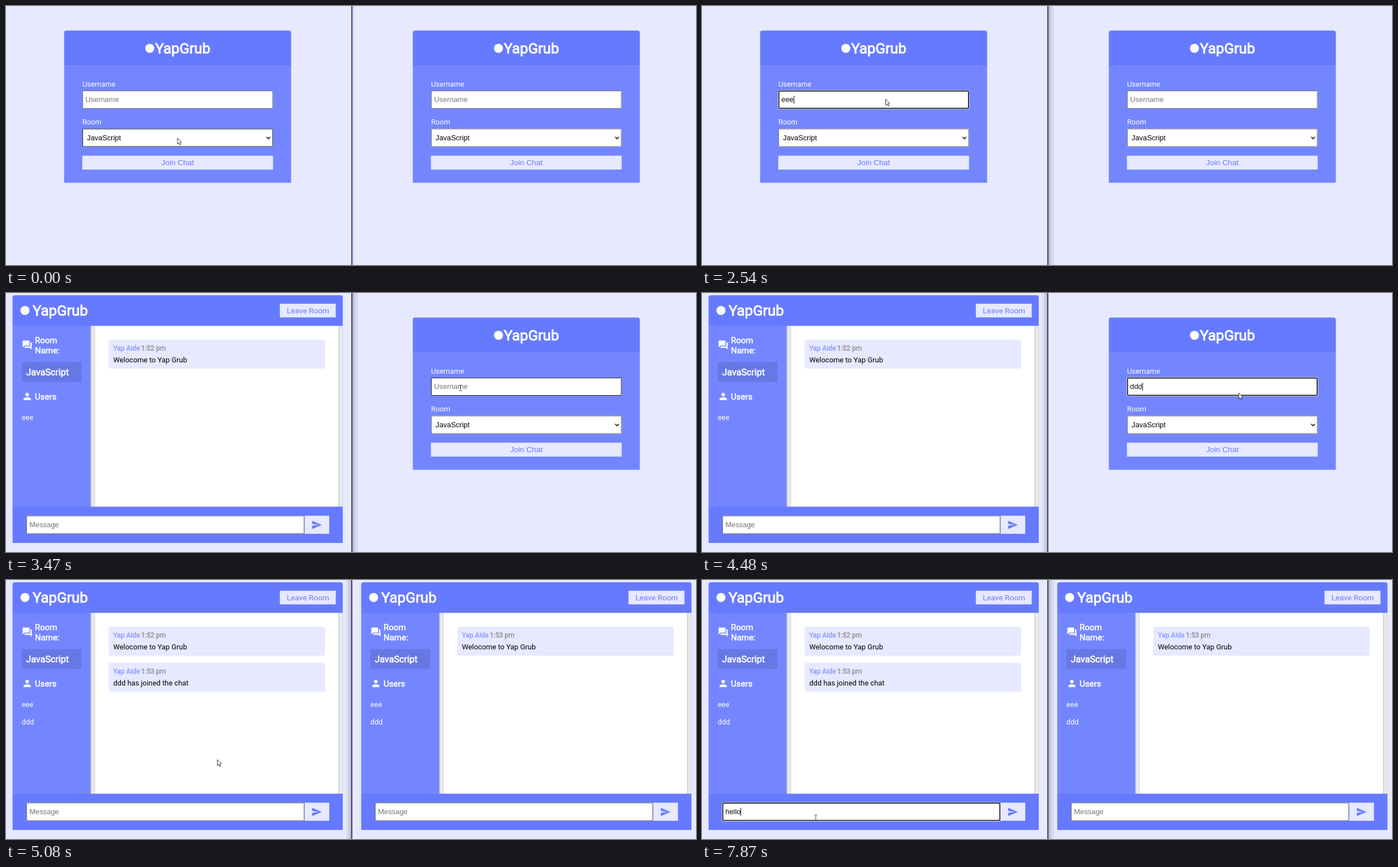
An HTML page with a canvas for the animation above (8 s loop, 1219 by 459 pixels).

```html
<!DOCTYPE html>
<html lang="en">
<head>
<meta charset="utf-8">
<title>Chat demo</title>
<style>
  html, body { margin: 0; width: 100%; height: 100%; overflow: hidden; background: #e6e9ff; }
  canvas { display: block; }
</style>
</head>
<body>
<canvas id="stage" width="1219" height="459"></canvas>
<script>
const ctx = document.getElementById('stage').getContext('2d');
const LOOP = 8000, RIGHT = 616, TICK = 1000 / 15;
const DARK = '#667aff', MID = '#7386ff', LIGHT = '#e6e9ff';
const ROBOTO = 'Roboto, sans-serif';
const ARIAL = '"Liberation Sans", Arial, sans-serif';
const TIMES = '"Liberation Serif", "Times New Roman", serif';
const BODY = 12.85, HEADING = 15, TITLE = 25.7, BUTTON = 13.64, ICON = 19.26;
const APP = 'YapGrub', APP_SPACED = 'Yap Grub', BOT = 'Yap Aide';
const USERS = ['eee', 'ddd'];

const ICONS = {
  forum: new Path2D('M21 6h-2v9H6v2c0 .55.45 1 1 1h11l4 4V7c0-.55-.45-1-1-1zm-4 6V3c0-.55-.45-1-1-1H3c-.55 0-1 .45-1 1v14l4-4h10c.55 0 1-.45 1-1z'),
  person: new Path2D('M12 12c2.21 0 4-1.79 4-4s-1.79-4-4-4-4 1.79-4 4 1.79 4 4 4zm0 2c-2.67 0-8 1.34-8 4v2h16v-2c0-2.66-5.33-4-8-4z'),
  send: new Path2D('M2.01 21L23 12 2.01 3 2 10l15 2-15 2z')
};

// Timeline in ms
const LEFT = { focus: 890, keys: [2080, 2210, 2410], busy: 2540, load: 2740, ready: 2810 };
const PEER = { focus: 3740, keys: [3950, 4150, 4280], busy: 4480, load: 4680, ready: 4750 };
const MESSAGE = { focus: 5740, keys: [7280, 7410, 7550, 7740, 7870], text: 'hello' };
const TIP = { from: 6340, to: 7340 };
const BLINK = 530;

// Pointer path: time, x, y
const PATH = [
  [330, 303, 234], [460, 306, 222], [600, 318, 182], [733, 324.5, 165],
  [3130, 324.5, 165], [3270, 420, 160], [3400, 700, 163], [3530, 900, 173], [3660, 948.5, 177],
  [4790, 948.5, 177], [4930, 760, 215], [5066, 374, 318], [5200, 262, 381],
  [5330, 212, 411], [5460, 199, 417.5], [5530, 200.5, 421]
];

const USER_FIELD = { x: 135, y: 150, w: 336.5, h: 32 };
const ROOM_FIELD = { x: 135, y: 217.5, w: 336.5, h: 32 };
const MESSAGE_FIELD = { x: 36, y: 394.7, w: 491, h: 32 };

const inside = (p, r) => p.x >= r.x && p.x <= r.x + r.w && p.y >= r.y && p.y <= r.y + r.h;
const within = (t, a, b) => t >= a && t < b;

function rect(x, y, w, h, color) {
  ctx.fillStyle = color;
  ctx.fillRect(x, y, w, h);
}

function roundRect(x, y, w, h, radii, color) {
  ctx.fillStyle = color;
  ctx.beginPath();
  ctx.roundRect(x, y, w, h, radii);
  ctx.fill();
}

function outline(r, grow, width, color, radius = 0) {
  ctx.strokeStyle = color;
  ctx.lineWidth = width;
  ctx.beginPath();
  ctx.roundRect(r.x - grow, r.y - grow, r.w + 2 * grow, r.h + 2 * grow, radius);
  ctx.stroke();
}

function text(str, x, y, size, family, color, weight = '') {
  ctx.font = `${weight} ${size}px ${family}`;
  ctx.fillStyle = color;
  ctx.fillText(str, x, y);
}

// Regular letters thickened by a stroke, keeping the regular advance widths
function thickText(str, x, y, size, color) {
  text(str, x, y, size, ROBOTO, color);
  ctx.strokeStyle = color;
  ctx.lineWidth = size / 27;
  ctx.lineJoin = 'round';
  ctx.strokeText(str, x, y);
}

function icon(name, x, y, color) {
  ctx.save();
  ctx.translate(x, y);
  ctx.scale(ICON / 24, ICON / 24);
  ctx.fillStyle = color;
  ctx.fill(ICONS[name]);
  ctx.restore();
}

function badge(x, y) {
  ctx.fillStyle = '#fff';
  ctx.beginPath();
  ctx.arc(x, y, 8, 0, 2 * Math.PI);
  ctx.fill();
}

const typed = (t, word, keys) => word.slice(0, keys.filter(k => t >= k).length);

function caretOn(t, { focus, keys }) {
  return t >= keys[0] || Math.floor((t - focus) / BLINK) % 2 === 0;
}

function field(r, value, placeholder, { hover, focused, caret }) {
  rect(r.x, r.y, r.w, r.h, '#fff');
  if (focused) {
    outline(r, 0.5, 1, '#fff', 2.5);
    outline(r, -0.7, 1.7, '#101010', 1.5);
  } else {
    outline(r, -0.5, 1, hover ? '#222' : '#767676');
  }
  const x = r.x + 5.3, base = r.y + 20.3;
  if (value) text(value, x, base, BODY, ARIAL, '#111');
  else text(placeholder, x, base, BODY, ARIAL, '#757575');
  if (focused && caret) {
    ctx.font = `${BODY}px ${ARIAL}`;
    rect(Math.round(x + ctx.measureText(value).width), r.y + 9, 1, 14, '#111');
  }
}

function joinPage(t, who, session, pointer) {
  roundRect(102.7, 43.5, 401, 63, [4, 4, 0, 0], DARK);
  rect(102.7, 106.3, 401, 207, MID);
  badge(254, 75);
  thickText(APP, 263.5, 84, TITLE, '#fff');

  text('Username', 135, 143, BODY, ROBOTO, '#fff');
  field(USER_FIELD, typed(t, who, session.keys), 'Username', {
    hover: inside(pointer, USER_FIELD),
    focused: t >= session.focus,
    caret: caretOn(t, session)
  });

  text('Room', 135, 210.3, BODY, ROBOTO, '#fff');
  const r = ROOM_FIELD;
  rect(r.x, r.y, r.w, r.h, '#fff');
  outline(r, -0.5, 1, inside(pointer, r) ? '#222' : '#767676');
  text('JavaScript', 143, 238, BODY, ARIAL, '#000');
  ctx.strokeStyle = '#111';
  ctx.lineWidth = 1.6;
  ctx.lineJoin = 'miter';
  ctx.beginPath();
  ctx.moveTo(460.3, 232);
  ctx.lineTo(463.6, 235.4);
  ctx.lineTo(466.9, 232);
  ctx.stroke();

  rect(134.7, 265.3, 337, 24.6, LIGHT);
  text('Join Chat', 274.5, 281.6, BUTTON, ARIAL, DARK);
}

function scrollTrack(x, y) {
  rect(x, y, 7.5, 321, '#eaeaea');
  rect(x, y, 1.5, 321, '#cfcfd4');
  rect(x + 6.5, y, 1, 321, '#d6d6d6');
}

function chatFrame(dy) {
  roundRect(11.6, 4, 583.4, 55, [4, 4, 0, 0], DARK);
  rect(11.6, 58.3 + dy, 138.4, 321, MID);
  rect(157, 58.3 + dy, 430.5, 321, '#fff');
  scrollTrack(149.7, 58.3 + dy);
  scrollTrack(587.3, 58.3 + dy);
  rect(11.6, 378.7 + dy, 583.4, 64.3, DARK);
}

function bareChat() {
  chatFrame(-2);
  text('sentiment_satisfied', 24, 36.5, ICON, TIMES, '#fff');
  text(APP, 176.7, 38.5, TITLE, ARIAL, '#fff', 'bold');
  rect(481, 17.7, 101.6, 24.5, LIGHT);
  text('Leave Room', 493, 34.2, BUTTON, ARIAL, DARK);
  text('forum', 28, 96, ICON, TIMES, '#fff');
  text('Room', 79, 86, HEADING, ARIAL, '#fff', 'bold');
  text('Name:', 79, 103.3, HEADING, ARIAL, '#fff', 'bold');
  rect(27.6, 119.4, 105.6, 16, 'rgba(0,0,0,.1)');
  text('person', 28, 167, ICON, TIMES, '#fff');
  text('Users', 83, 165.5, HEADING, ARIAL, '#fff', 'bold');
  field({ x: 36, y: 392.9, w: 475.5, h: 32 }, '', 'Message', {});
  rect(511.5, 392.9, 59.6, 32, LIGHT);
  text('send', 523.5, 415.5, ICON, TIMES, DARK);
}

function message(y, time, body) {
  roundRect(181.4, y, 382.2, 51.4, 4, LIGHT);
  ctx.globalAlpha = 0.7;
  thickText(BOT, 189.5, y + 19.4, 12.04, MID);
  thickText(time, 238.8, y + 19.4, 12.04, '#777');
  ctx.globalAlpha = 1;
  text(body, 189.5, y + 40.1, BODY, ROBOTO, '#000');
}

function chatPage({ time, users, joined, value = '', input = {} }) {
  chatFrame(0);
  badge(33.5, 31);
  thickText(APP, 47, 40.2, TITLE, '#fff');
  rect(483.8, 19, 98.8, 24.2, LIGHT);
  text('Leave Room', 496, 36, BUTTON, ROBOTO, DARK);

  icon('forum', 27.8, 82.7, '#fff');
  thickText('Room', 51, 89, HEADING, '#fff');
  thickText('Name:', 51, 106.7, HEADING, '#fff');
  rect(27.6, 122.5, 105.6, 35, 'rgba(0,0,0,.1)');
  thickText('JavaScript', 35.6, 146, 16.05, '#fff');
  icon('person', 27.8, 173.6, '#fff');
  thickText('Users', 51, 189, HEADING, '#fff');
  users.forEach((u, i) => text(u, 27.8, 225 + 31.3 * i, BODY, ROBOTO, '#fff'));

  message(82.7, time, `Welocome to ${APP_SPACED}`);
  if (joined) message(146.5, joined.time, `${joined.user} has joined the chat`);

  field(MESSAGE_FIELD, value, 'Message', input);
  rect(527.5, 394.7, 43.6, 32, LIGHT);
  icon('send', 539.3, 401.3, DARK);
}

function divider(t) {
  const peerActive = within(t, PEER.focus, MESSAGE.focus);
  const reach = peerActive ? -12 : t < LEFT.focus ? 5 : 13;
  const g = ctx.createLinearGradient(611, 0, 611 + reach, 0);
  g.addColorStop(0, `rgba(30,30,60,${t < LEFT.focus ? 0.22 : 0.34})`);
  g.addColorStop(0.45, 'rgba(30,30,60,.11)');
  g.addColorStop(1, 'rgba(30,30,60,0)');
  rect(Math.min(611, 611 + reach), 0, Math.abs(reach), 459, g);
  rect(610.2, 0, 1.5, 459, '#1c1c24');
}

function pointerAt(t) {
  const q = Math.floor(t / TICK) * TICK;
  const next = PATH.findIndex(k => k[0] > q);
  if (next === 0) return { x: PATH[0][1], y: PATH[0][2] };
  const a = PATH.at(next < 0 ? -1 : next - 1);
  const b = next < 0 ? a : PATH[next];
  const f = a === b ? 0 : (q - a[0]) / (b[0] - a[0]);
  return { x: a[1] + (b[1] - a[1]) * f, y: a[2] + (b[2] - a[2]) * f };
}

function arrow({ x, y }) {
  const shape = [[0, 0], [0, 10.8], [2.5, 8.6], [4.2, 12.3], [5.9, 11.5], [4.2, 8], [7.2, 7.7]];
  ctx.beginPath();
  shape.forEach(([dx, dy]) => ctx.lineTo(x + dx, y + dy));
  ctx.closePath();
  ctx.fillStyle = '#fff';
  ctx.fill();
  ctx.strokeStyle = '#222';
  ctx.lineWidth = 0.9;
  ctx.lineJoin = 'miter';
  ctx.stroke();
}

function beam({ x, y }) {
  rect(x, y - 5, 1, 10.5, '#444');
  for (const dy of [-5.3, 4.7]) {
    rect(x - 2, dy + y, 2, 1, '#555');
    rect(x + 1, dy + y, 2, 1, '#555');
  }
}

function drawPointer(t, p, peer) {
  const busy = s => within(t, s.busy, s.load);
  const loading = s => within(t, s.load, s.ready);
  const overText = t < LEFT.load && inside(p, USER_FIELD)
    || t < PEER.load && inside(peer, USER_FIELD)
    || t >= LEFT.ready && inside(p, MESSAGE_FIELD);
  const isBeam = loading(LEFT) || loading(PEER) || overText && !busy(LEFT) && !busy(PEER);
  (isBeam ? beam : arrow)(p);
}

function tooltip() {
  rect(201, 437, 85, 15, '#fff');
  outline({ x: 201, y: 437, w: 85, h: 15 }, -0.4, 0.7, '#888');
  text('Please fill out this field.', 204.5, 447, 6.9, '"Open Sans", sans-serif', '#444');
}

function draw(t) {
  const p = pointerAt(t), peer = { x: p.x - RIGHT, y: p.y };
  const joined = t >= PEER.ready;
  rect(0, 0, 1219, 459, LIGHT);

  if (t < LEFT.load) joinPage(t, USERS[0], LEFT, p);
  else if (t < LEFT.ready) bareChat();
  else chatPage({
    time: '1:52 pm',
    users: joined ? USERS : USERS.slice(0, 1),
    joined: joined && { user: USERS[1], time: '1:53 pm' },
    value: typed(t, MESSAGE.text, MESSAGE.keys),
    input: {
      hover: inside(p, MESSAGE_FIELD),
      focused: t >= MESSAGE.focus,
      caret: caretOn(t, MESSAGE)
    }
  });

  ctx.save();
  ctx.translate(RIGHT, 0);
  if (t < PEER.load) joinPage(t, USERS[1], PEER, peer);
  else if (t < PEER.ready) bareChat();
  else chatPage({ time: '1:53 pm', users: USERS });
  ctx.restore();

  divider(t);
  if (within(t, TIP.from, TIP.to)) tooltip();
  drawPointer(t, p, peer);
}

const start = performance.now();
function tick() {
  draw((performance.now() - start) % LOOP);
  requestAnimationFrame(tick);
}
tick();
</script>
</body>
</html>
```
